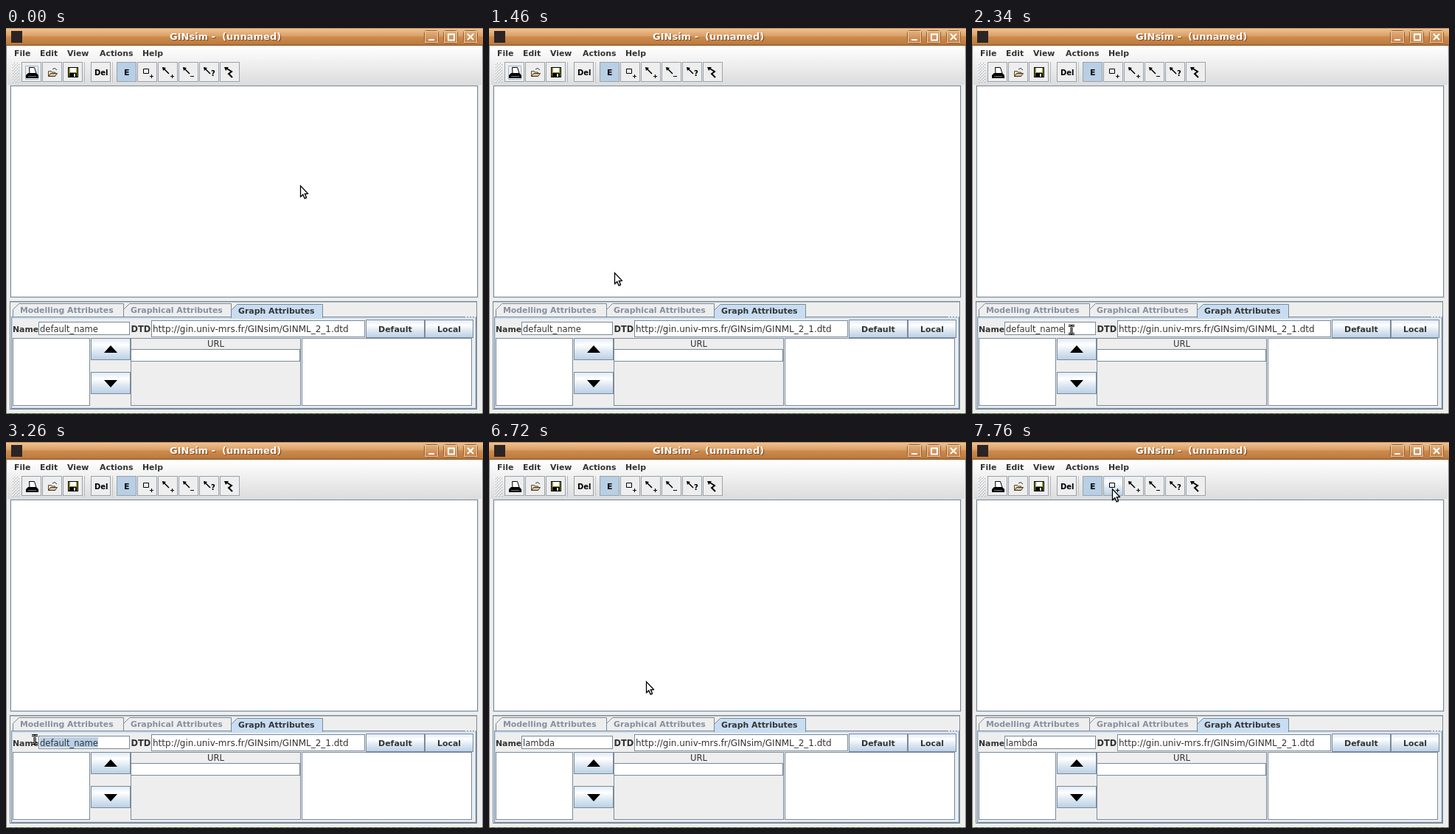
Recreate the animation shown at these times as an HTML page with a canvas. Size 647 by 523 pixels, loop 8000 ms.

```html
<!DOCTYPE html>
<html lang="en">
<head>
<meta charset="utf-8">
<title>Graph editor</title>
<style>
html, body { margin: 0; width: 100%; height: 100%; overflow: hidden; background: #eee; }
canvas { display: block; }
</style>
</head>
<body>
<canvas id="stage" width="647" height="523"></canvas>
<script>
const ctx = document.getElementById('stage').getContext('2d');
const LOOP = 8000, STEP = 40, BLINK = 530;
const EDGE = '#7a8a99', PALE = '#eeeeee', BLUE = '#b8cfe5', TAB = '#c8ddf2', INK = '#333333';
const FACE = '"DejaVu Sans", sans-serif';
const BOLD = 'bold 10.9px ' + FACE;
const FIELD = '11.5px ' + FACE;
const TEXT_X = 46.6;
const DRAG = 2340, DRAG_END = 2730;
const WORD = 'lambda';
const KEYS = [4150, 4310, 4790, 5440, 5800, 5880];

// Each move passes through evenly timed points on a smooth curve
const MOVES = [
  { from: 820, steps: 3, via: [[399, 213], [413, 219]] },
  { from: 1220, steps: 21, via: [[413, 219], [170, 331], [86, 418], [129, 403]] },
  { from: 2060, steps: 2, via: [[129, 403], [135, 402]] },
  { from: DRAG, steps: 12, via: [[143, 407], [38, 400]] },
  { from: 6520, steps: 32, via: [[38, 400], [221, 317], [260, 165], [236, 72], [204, 66], [190, 63]] }
];

function rect(x, y, w, h, color) {
  ctx.fillStyle = color;
  ctx.fillRect(x, y, w, h);
}

function box(x, y, w, h, fill, edge = EDGE) {
  rect(x, y, w, h, edge);
  rect(x + 1, y + 1, w - 2, h - 2, fill);
}

function text(str, x, y, font = BOLD, color = INK) {
  ctx.font = font;
  ctx.fillStyle = color;
  ctx.fillText(str, x, y);
}

function path(d, fill, stroke, width = 1, x = 0, y = 0) {
  const p = new Path2D(d);
  ctx.save();
  ctx.translate(x, y);
  if (fill) {
    ctx.fillStyle = fill;
    ctx.fill(p);
  }
  if (stroke) {
    ctx.strokeStyle = stroke;
    ctx.lineWidth = width;
    ctx.stroke(p);
  }
  ctx.restore();
}

function shade(y, h, stops) {
  const g = ctx.createLinearGradient(0, y, 0, y + h);
  stops.forEach(([at, color]) => g.addColorStop(at, color));
  return g;
}

const glossy = (y, h) => shade(y, h, [[0, '#dde8f3'], [0.3, '#ffffff'], [0.6, '#dde8f3'], [1, BLUE]]);

function button(x, y, w, h) {
  box(x, y, w, h, glossy(y, h));
}

function titleBar() {
  rect(0, 0, 647, 24, shade(0, 24, [[0, '#9c6a3c'], [0.06, '#efc08f'], [0.45, '#d99f66'],
    [0.5, '#cc8b4c'], [0.92, '#bd7a3e'], [1, '#7d4f28']]));
  rect(7, 4, 15, 16, '#2c2424');
  const font = 'bold 13px ' + FACE;
  text('GINsim -\u00a0 (unnamed)', 223, 17, font, '#7a4520');
  text('GINsim -\u00a0 (unnamed)', 222, 16, font, '#ffffff');
  const glyphs = ['M573 16h8', 'M600 8.5h8v8h-8z', 'M626 8l8 8m0 -8l-8 8'];
  glyphs.forEach((d, i) => {
    const x = 567 + Math.round(i * 26.4);
    ctx.beginPath();
    ctx.roundRect(x + 0.5, 3.5, 19, 17, 3);
    ctx.fillStyle = shade(3, 18, [[0, '#e6b27f'], [1, '#c07c42']]);
    ctx.fill();
    ctx.strokeStyle = '#8a5830';
    ctx.lineWidth = 1;
    ctx.stroke();
    ctx.strokeStyle = '#f0cda6';
    ctx.strokeRect(x + 1.5, 4.5, 17, 15);
    path(d, null, '#fff', 2);
  });
}

function edgeIcon(x) {
  path('M7 54l8 8', null, '#000', 1.6, x);
  path('M6 53l5 1l-4 4z', '#000', null, 1, x);
}

function icons() {
  const small = 'bold 10px ' + FACE;
  // print
  path('M31.5 53.5h7l2.5 8h-9z', '#fff', '#000');
  path('M30 61h11l3 3v4h-17v-4z', '#000');
  rect(30, 65, 11, 1, '#777');
  // open
  path('M57.5 65.5v-7h4l1 1.5h4v5.5z', '#e9dcc4', '#5a4a38');
  path('M57.5 65.5l3 -4h9l-3 4z', '#d9c09a', '#3a3028');
  path('M63 56l3 -1.5l3 2.5', null, '#333');
  // save
  box(84, 53, 14, 14, '#8c8c30', '#000');
  rect(87, 54, 8, 6, '#fff');
  rect(86, 61, 10, 6, '#000');
  rect(92, 62, 2, 4, '#fff');
  text('Del', 120, 64, small, '#000');
  text('E', 160, 64, 'bold 11px ' + FACE, '#000');
  // add node, then the edge tools
  path('M186.5 55.5h7v6h-7z', null, '#000');
  [206, 234, 262].forEach(edgeIcon);
  const plus = 'M-2 .5h5M.5 -2v5';
  path(plus, null, '#000', 1, 197, 65);
  path(plus, null, '#000', 1, 225, 65);
  rect(250, 65, 5, 1, '#000');
  text('?', 278, 65, small, '#000');
  path('M298 54l8 5l-4 3l5 5', null, '#000', 2);
  path('M296 53h6l-4 5z', '#000');
}

function toolGroup(x, count, mouse, selected = -1) {
  for (let i = 0; i < count; i++) {
    const left = x + i * 28;
    const hover = mouse[0] >= left && mouse[0] < left + 27 && mouse[1] >= 46 && mouse[1] < 74;
    box(left, 46, 27, 27, i === selected ? BLUE : hover ? glossy(46, 27) : PALE, '#9aa2aa');
  }
}

function toolbar(mouse, focused) {
  rect(2, 24, 643, 53, shade(24, 53, [[0, '#ffffff'], [1, '#dcdcdc']]));
  [['File', 11], ['Edit', 46], ['View', 83], ['Actions', 127], ['Help', 185]]
    .forEach(([s, x]) => text(s, x, 38));
  for (let y = 46; y < 74; y += 2)
    for (let x = 8 + y % 4; x < 18; x += 4) {
      rect(x, y, 1, 1, '#ffffff');
      rect(x + 1, y + 1, 1, 1, '#98a0a8');
    }
  rect(106, 46, 1, 28, '#b8b8b8');
  rect(144, 46, 1, 28, '#c4c4c4');
  toolGroup(21, 3, mouse);
  toolGroup(115, 1, mouse);
  toolGroup(150, 6, mouse, 0);
  if (focused) path('M26.5 51.5h17v18h-17z', null, '#a3b8cc');
  icons();
}

function tab(x, w, label, selected) {
  const top = selected ? 374.5 : 373.5, bottom = selected ? 393 : 391.5;
  const d = `M${x + 0.5} ${bottom}V${top + 8}l8 -8H${x + w - 0.5}V${bottom}`;
  path(d, selected ? TAB : PALE, EDGE);
  text(label, x + 10, selected ? 387 : 386, BOLD, selected ? INK : '#8490a2');
}

function panels() {
  // drawing area
  rect(5, 77, 636, 289, '#d5dae0');
  box(6, 78, 634, 287, '#fff');
  // attribute pane
  box(5, 370, 634, 147, PALE);
  rect(6, 371, 632, 1, '#b4bcc4');
  tab(9, 151, 'Modelling Attributes', false);
  tab(159, 147, 'Graphical Attributes', false);
  box(7, 391, 631, 125, TAB);
  rect(9, 394, 627, 120, PALE);
  tab(305, 125, 'Graph Attributes', true);
  rect(306, 391, 123, 3, TAB);
  for (let x = 623; x < 636; x += 4) rect(x, 391, 2, 1, PALE);

  text('Name', 9, 412);
  text('DTD', 169.5, 412, 'bold 11.4px ' + FACE);
  box(197, 396, 290, 23, '#fff');
  text('http://gin.univ-mrs.fr/GINsim/GINML_2_1.dtd', 199, 412, '12px ' + FACE);
  button(488, 395, 80, 25);
  button(568, 395, 66, 25);
  text('Default', 505, 412, 'bold 11px ' + FACE);
  text('Local', 585, 412);

  box(9, 420, 105, 92, '#fff');
  button(115, 420, 54, 30);
  button(115, 466, 54, 30);
  path('M133 440l9 -10l9 10z', '#000');
  path('M133 477l9 10l9 -10z', '#000');
  box(169, 420, 231, 92, PALE);
  text('URL', 273, 432, '11.6px ' + FACE);
  box(169, 435, 230, 17, '#fff');
  box(401, 420, 231, 92, '#fff');
}

function windowFrame() {
  rect(0, 0, 647, 523, PALE);
  for (const x of [0, 646]) rect(x, 24, 1, 499, '#8f8a84');
  rect(0, 522, 647, 1, '#5a4a3a');
  for (let x = 0; x < 647; x += 8) rect(x, 522, 4, 1, '#3f8a3a');
}

function caretX(str) {
  ctx.font = FIELD;
  return Math.floor(TEXT_X + ctx.measureText(str).width);
}

function nameField(t, mouseX) {
  const count = KEYS.filter(k => t >= k).length;
  const str = count ? WORD.slice(0, count) : 'default_name';
  box(44, 398, 124, 18, '#fff');

  let caret = caretX(str);
  if (t >= DRAG && !count) {
    // Selection snaps to the closest gap between letters
    const end = caret;
    const gap = x => Math.abs(x - mouseX);
    for (let i = 0; i < str.length; i++) {
      const x = caretX(str.slice(0, i));
      if (gap(x) < gap(caret)) caret = x;
    }
    rect(caret, 400, end - caret, 14, BLUE);
  }
  text(str, 46, 412, FIELD);

  // Blinking restarts at each input
  const last = [DRAG, DRAG_END, ...KEYS].filter(e => t >= e).pop();
  if (last && Math.floor((t - last) / BLINK) % 2 === 0) rect(caret, 400, 1, 14, '#444');
}

function pointer(x, y) {
  const arrow = 'M.5 .8V15.5l3.3 -2.9l2.2 5.2l2.5 -1.1l-2.2 -5.1l4 -.3z';
  path(arrow, 'rgba(0,0,0,0.3)', null, 1, x + 0.8, y + 1.6);
  path(arrow, '#fff', '#000', 1.3, x, y);
}

function iBeam(x, y) {
  const beam = 'M-3 1.5h3l1 1l1 -1h3M1 2.5v9M-3 12.5h3l1 -1l1 1h3';
  path(beam, null, '#000', 3, x, y);
  path(beam, null, '#fff', 0.8, x, y);
}

// Catmull-Rom curve with clamped ends, k from 0 to 1
function curve(points, k) {
  const last = points.length - 1;
  const i = Math.min(Math.floor(k * last), last - 1), u = k * last - i;
  const at = j => points[Math.max(0, Math.min(last, j))];
  return [0, 1].map(n => {
    const [a, b, c, d] = [-1, 0, 1, 2].map(o => at(i + o)[n]);
    if (last === 1) return Math.round(b + (c - b) * u);
    return Math.round(b + u * ((c - a) / 2 + u * (a - 2.5 * b + 2 * c - d / 2 + u * (1.5 * (b - c) + (d - a) / 2))));
  });
}

function mouseAt(t) {
  const move = MOVES.filter(m => t >= m.from).pop();
  if (!move) return MOVES[0].via[0];
  const step = Math.floor((t - move.from) / STEP) + 1;
  return curve(move.via, Math.min(1, step / move.steps));
}

function draw(t) {
  const mouse = mouseAt(t), [x, y] = mouse;
  windowFrame();
  titleBar();
  toolbar(mouse, t < DRAG);
  panels();
  nameField(t, x);
  if (t >= DRAG && t < KEYS[0]) iBeam(x, y - 4);
  else pointer(x, y);
}

const start = performance.now();
function tick() {
  draw((performance.now() - start) % LOOP);
  requestAnimationFrame(tick);
}
tick();
</script>
</body>
</html>
```
